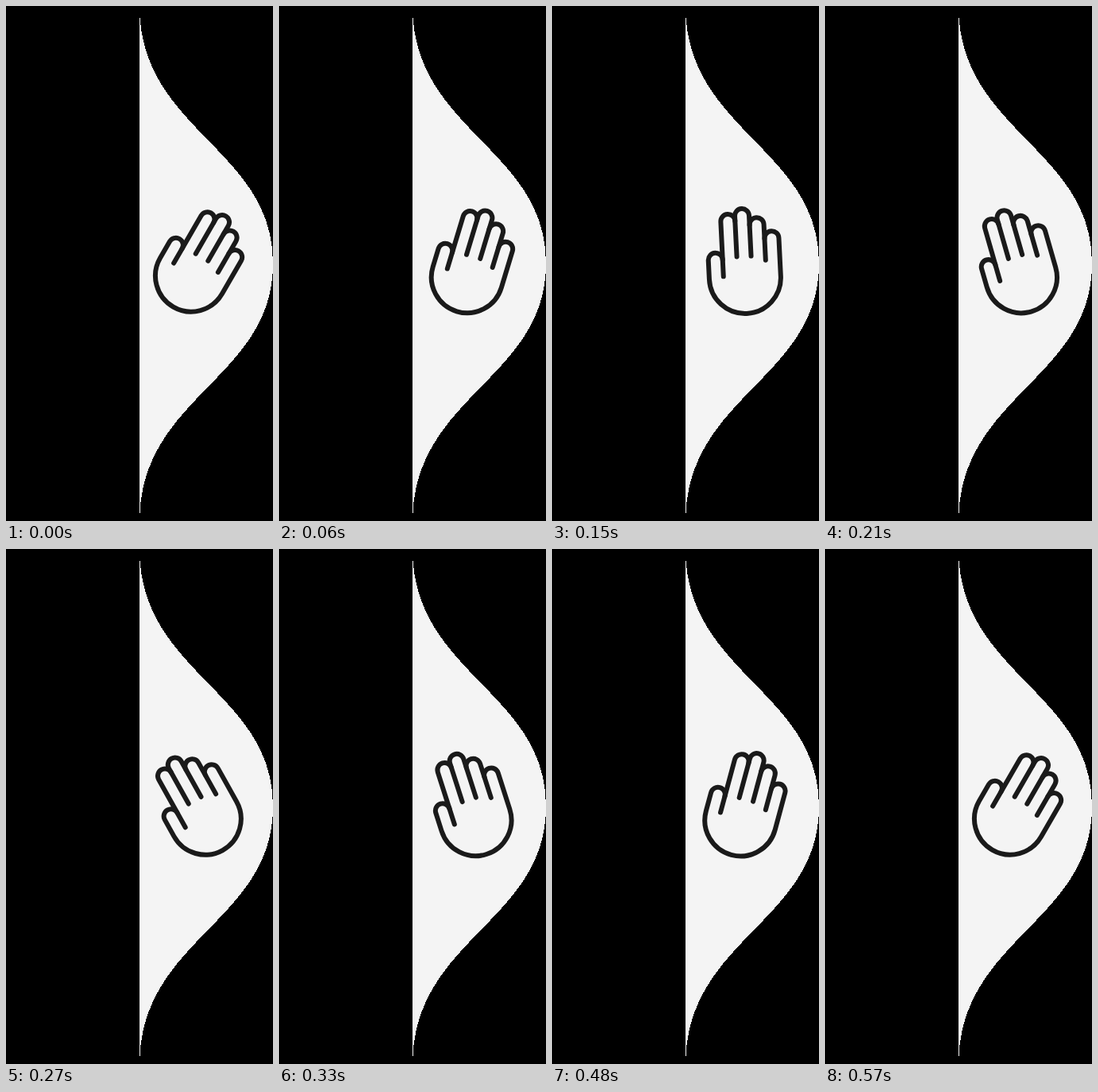
These frames come from a looping animation (336 by 648 pixels, 780 ms). An HTML page:

```html
<!DOCTYPE html>
<html lang="en">
<head>
<meta charset="utf-8">
<title>Waving hand</title>
<style>
  html, body { margin: 0; width: 100%; height: 100%; overflow: hidden; background: #000; }
  svg { display: block; width: 336px; height: 648px; }
  .bulge { fill: #f4f4f4; shape-rendering: crispEdges; }
  .hand { fill: none; stroke: #1a1a1a; stroke-linecap: round; stroke-linejoin: round; }
</style>
</head>
<body>
<svg viewBox="0 0 336 648">
  <path class="bulge" d="M168 0 C168 157 336 179 336 324 C336 469 168 491 168 648 Z"/>
  <!-- The hand is drawn upright around its pivot, one unit per stroke width -->
  <g id="hand" class="hand">
    <path d="M-4.5 2.5 V-9 a1.5 1.5 0 0 1 3 0"/>
    <path d="M-1.5 -1.5 V-10 a1.5 1.5 0 0 1 3 0 V-1.5"/>
    <path d="M1.5 -8 a1.5 1.5 0 0 1 3 0 V-.5"/>
    <path d="M4.5 -5 a1.5 1.5 0 0 1 3 0 V3 a7.5 7.5 0 0 1 -15 0 V-1 a1.5 1.5 0 0 1 3 0"/>
  </g>
</svg>
<script>
  const LOOP = 780, STEP = 30, SWING = 274, TILT = 30;
  const hand = document.getElementById('hand');
  const start = performance.now();

  // Linear swing from +TILT to -TILT and back, then rest
  function angleAt(ms) {
    const fromTurn = Math.min(Math.abs(ms - SWING) / SWING, 1);
    return TILT * (2 * fromTurn - 1);
  }

  function draw(now) {
    const ms = Math.max(0, now - start) % LOOP;
    const stepped = Math.floor(ms / STEP) * STEP;
    hand.setAttribute('transform', `translate(242 324) rotate(${angleAt(stepped)}) scale(6)`);
    requestAnimationFrame(draw);
  }
  draw(start);
</script>
</body>
</html>
```
